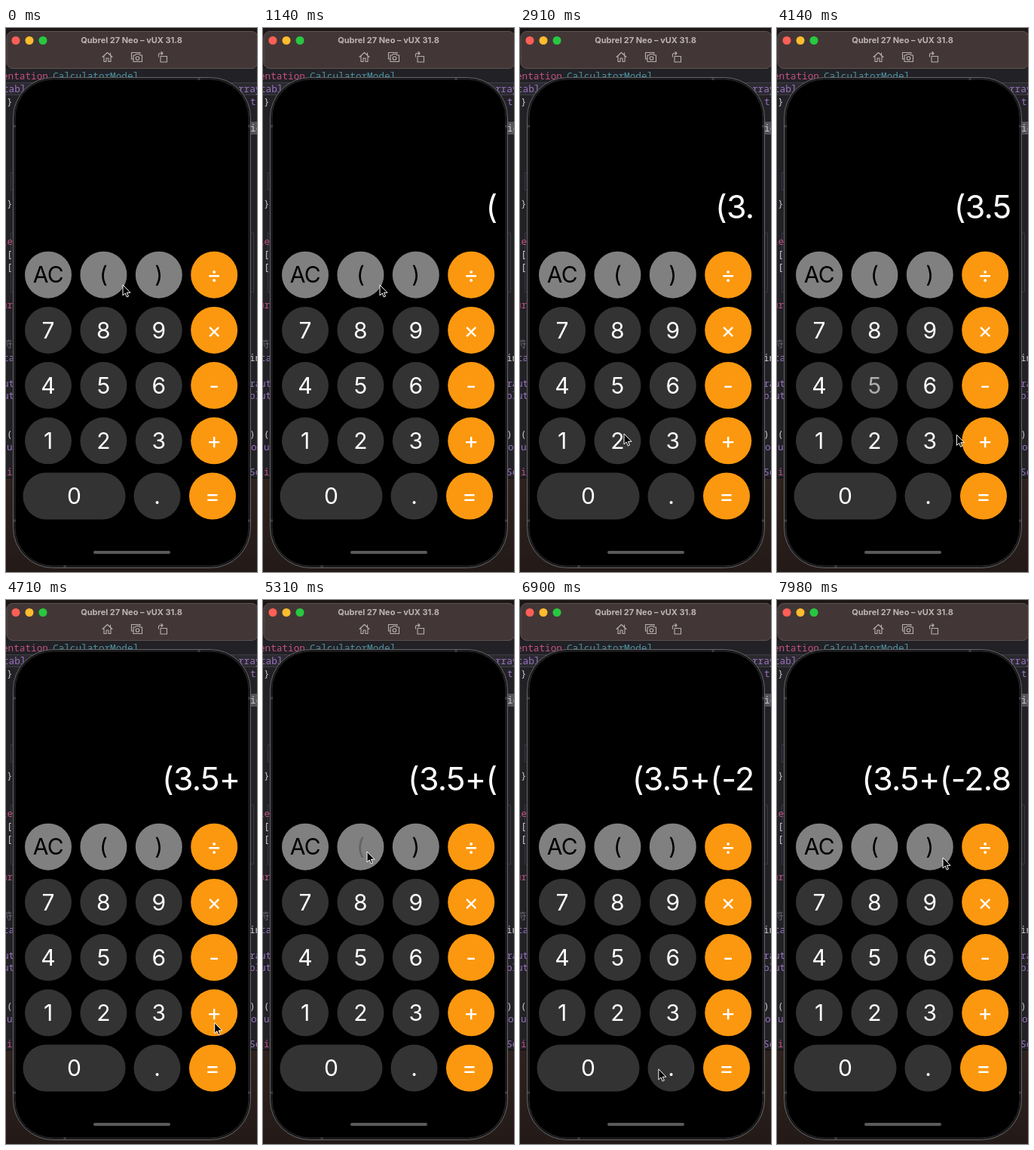
Recreate the animation shown at these times as an HTML page. Size 333x720 px, loop 8 s.

```html
<!DOCTYPE html>
<html lang="en">
<head>
<meta charset="utf-8">
<title>Calculator</title>
<style>
  html, body { margin: 0; width: 100%; height: 100%; overflow: hidden; background: #1c1414; }
  svg { display: block; width: 333px; height: 720px; }
  text {
    font-family: Inter, "Noto Sans", sans-serif;
    font-optical-sizing: none;
    font-feature-settings: "calt" 0;
  }
  #code text { font: 12.7px "Noto Sans Mono", monospace; white-space: pre; }
  #keys text { font-size: 30px; text-anchor: middle; }
  #display { font-size: 43px; letter-spacing: -0.7px; text-anchor: end; fill: #fff; }
  #title { font-size: 11px; font-weight: 700; text-anchor: middle; fill: #bdb4b3; }
</style>
</head>
<body>
<svg viewBox="0 0 333 720">
  <defs>
    <linearGradient id="desk" x2="0" y2="1">
      <stop offset="0" stop-color="#2e221e"/>
      <stop offset="1" stop-color="#231a17"/>
    </linearGradient>
  </defs>
  <rect width="333" height="720" fill="#1d1617"/>
  <rect y="53" width="333" height="543" fill="#212126"/>
  <rect y="72" width="333" height="17" fill="#2b2a30"/>
  <path d="M0 72.500H333M0 88.500H333" stroke="#403c48"/>
  <rect y="596" width="333" height="124" fill="url(#desk)"/>
  <path d="M0 595.500H333" stroke="#0d0b0c"/>
  <path d="M11 191.500H6.500V214.500H11M11 271.500H6.500V349.500H11M323 271.500H328.500V349.500H323" fill="none" stroke="#3b3940"/>
  <rect x="323" y="124" width="10" height="17" fill="#55535a"/>
  <g id="code"></g>

  <rect x="1" y="4.500" width="333" height="49" rx="8" fill="#423736" stroke="#5d5251"/>
  <circle cx="13" cy="16.500" r="5.500" fill="#ff5f57"/>
  <circle cx="31" cy="16.500" r="5.500" fill="#febc2e"/>
  <circle cx="49" cy="16.500" r="5.500" fill="#28c840"/>
  <text id="title" x="166.500" y="20">Qubrel 27 Neo – vUX 31.8</text>
  <g fill="none" stroke="#b9b0b0" stroke-width="1.100" stroke-linejoin="round" stroke-linecap="round">
    <path d="M128 38.500L134.500 32.500L141 38.500M130 37.500V44.500H133V40H136V44.500H139V37.500M138.500 33V35.500"/>
    <path d="M168.500 41H166.500V32.500H178V34M169 36H171.500L172.500 34.500H176.500L177.500 36H180.500V44.500H169Z"/>
    <circle cx="174.500" cy="40" r="2.300"/>
    <path d="M205 37.500H213.500V45H205ZM202.500 38V35.500Q202.500 33.500 204.500 33.500H208M206 31.500L208 33.500L206 35.500"/>
  </g>

  <rect x="9.500" y="65.500" width="315" height="649" rx="53" fill="#171719" stroke="#666668"/>
  <rect x="12" y="68" width="310" height="644" rx="50.500" fill="#000" stroke="#29292b"/>
  <path d="M256 66V69M78 711V714M10 130H13M321 130H324M10 652H13M321 652H324" stroke="#3c3c3e" stroke-width="3"/>
  <rect x="116" y="692" width="102" height="4" rx="2" fill="#5a5a5a"/>
  <text id="display" x="310.500" y="252"></text>
  <g id="keys"></g>
  <path id="cursor" d="M0 0V14L3.200 11L5.300 16L7.500 15L5.400 10.300H10Z" fill="#000" stroke="#fff" stroke-linejoin="round"/>
</svg>
<script>
const LOOP = 8000, FADE = 350, DIM = 0.2;
const PINK = '#c4527f', PURPLE = '#9a72c0', TEAL = '#4c93a0', PLAIN = '#c8c6ca';
const $ = id => document.getElementById(id);

function add(parent, tag, attrs, text = '') {
  const el = document.createElementNS('http://www.w3.org/2000/svg', tag);
  for (const name in attrs) el.setAttribute(name, attrs[name]);
  el.textContent = text;
  parent.append(el);
  return el;
}

// Editor text showing around the phone: x, baseline, colour, text
[
  [-5, 68, PINK, 'entation'], [62, 68, TEAL, 'CalculatorModel'],
  [-4, 85, PURPLE, 'table'], [308, 85, PURPLE, 'rray'],
  [1, 102, PLAIN, '}'], [324, 102, PURPLE, 't'], [324, 137, PLAIN, 'ic'],
  [1, 237, PLAIN, '}'], [-6, 287, PINK, 'le'], [1, 304, PLAIN, '['], [1, 321, PLAIN, '['],
  [-6, 371, PINK, 'ur'], [-4, 423, '#6d7078', '符'],
  [-4, 441, PURPLE, 'ta'], [323, 441, PLAIN, 'in'],
  [-4, 475, PURPLE, 'ut'], [323, 475, PURPLE, 'ra'],
  [-4, 491, PURPLE, 'ut'], [323, 491, PURPLE, 'bl'],
  [1, 542, PLAIN, '('], [323, 542, PLAIN, ')'],
  [1, 559, PURPLE, 'u'], [325, 559, PURPLE, 'o'],
  [1, 592, PINK, 'i'], [323, 592, PURPLE, 'Sc']
].forEach(([x, y, fill, text]) => add($('code'), 'text', { x, y, fill }, text));

// Keypad
const labels = {};
function addKey(label, cx, cy, width = 62) {
  const light = ['AC', '(', ')'].includes(label);
  const fill = light ? '#808080' : '÷×-+='.includes(label) ? '#fc980f' : '#333';
  add($('keys'), 'rect', { x: cx - width / 2, y: cy - 31, width, height: 62, rx: 31, fill });
  labels[label] = add($('keys'), 'text', { x: cx, y: cy + 10.7, fill: light ? '#000' : '#fff' }, label);
}
['AC ( ) ÷', '7 8 9 ×', '4 5 6 -', '1 2 3 +'].forEach((row, r) =>
  row.split(' ').forEach((label, c) => addKey(label, 56 + c * 73.4, 326.7 + r * 73.2)));
addKey('0', 90.5, 619.5, 136);
addKey('.', 200.5, 619.5);
addKey('=', 274, 619.5);
labels.AC.style.letterSpacing = '-0.6px';

// Key, press time, release time
const taps = [
  ['(', 480, 570], ['3', 1660, 1770], ['.', 2320, 2420], ['5', 3840, 3965], ['+', 4300, 4400],
  ['(', 5190, 5280], ['-', 6030, 6130], ['2', 6470, 6530], ['.', 6960, 7060], ['8', 7480, 7560]
];

// Pointer stops: time, x, y
const stops = [
  [0, 155, 340], [1140, 155, 340], [1620, 195, 573], [1950, 195, 573], [2280, 196, 622],
  [2640, 196, 622], [2910, 138, 537], [3050, 138, 537], [3560, 134, 480], [3950, 134, 480],
  [4240, 277, 560], [4700, 277, 560], [5130, 138, 333], [5600, 138, 333], [5930, 272, 478],
  [6160, 272, 478], [6450, 132, 555], [6600, 132, 555], [6910, 184, 621], [7130, 184, 621],
  [7440, 134, 406], [7620, 134, 406], [7960, 220, 341], [LOOP, 220, 341]
];

const ease = u => u * u * (3 - 2 * u);

function render(t) {
  for (const key in labels) labels[key].setAttribute('opacity', 1);
  let shown = '';
  for (const [key, down, up] of taps) {
    if (t >= up) shown += key;
    if (t >= down && t < up + FADE) {
      const u = Math.max(0, (t - up) / FADE);
      labels[key].setAttribute('opacity', DIM + (1 - DIM) * ease(u));
    }
  }
  $('display').textContent = shown;

  const i = stops.findIndex(stop => stop[0] > t);
  const [t0, x0, y0] = stops[i - 1], [t1, x1, y1] = stops[i];
  const k = ease((t - t0) / (t1 - t0));
  $('cursor').setAttribute('transform', `translate(${x0 + (x1 - x0) * k} ${y0 + (y1 - y0) * k})`);
}

const start = performance.now();
function tick() {
  render((performance.now() - start) % LOOP);
  requestAnimationFrame(tick);
}
tick();
</script>
</body>
</html>
```
